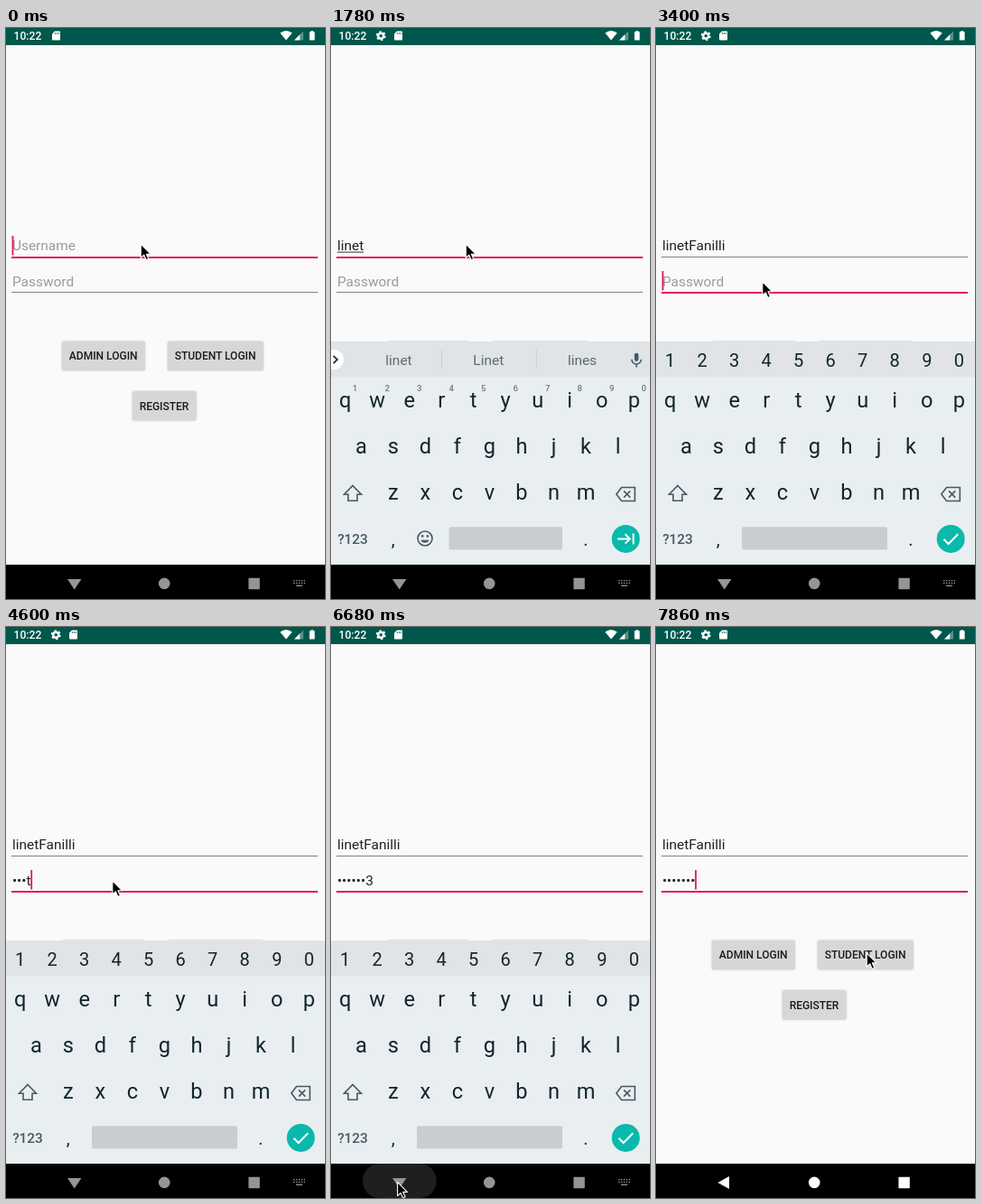
An HTML page for the animation above (8000 ms loop, 353 px wide and 632 px high).

```html
<!DOCTYPE html>
<html lang="en">
<head>
<meta charset="utf-8">
<title>Login screen</title>
<style>
  html, body { margin: 0; width: 100%; height: 100%; overflow: hidden; background: #fafafa; }
  svg { display: block; width: 100vw; height: 100vh; }
  text { font-family: Roboto, sans-serif; white-space: pre; }
  .mid { text-anchor: middle; }
  .field { font-size: 15.46px; fill: #212121; }
  .hint { fill: #9a9a9a; }
  .rule { fill: #808080; height: 1px; shape-rendering: crispEdges; }
  .rule.focus { fill: #e0165f; height: 2px; }
  .btn rect { fill: #d6d7d7; filter: drop-shadow(0 .8px .8px #0004); }
  .btn text { font-size: 12.03px; font-weight: 500; fill: #1c1c1c; text-anchor: middle; }
  .key { font-size: 23.6px; fill: #10262f; text-anchor: middle; }
  .digit { font-size: 20px; }
  .sup { font-size: 9.6px; font-weight: 500; fill: #6d7a80; text-anchor: middle; }
  .word { font-size: 15.46px; fill: #5c6a72; text-anchor: middle; }
  .line { fill: none; stroke: #455a64; stroke-width: 1.6; }
  .white { fill: none; stroke: #fff; stroke-width: 2; }
  .off { display: none; }
</style>
</head>
<body>
<svg viewBox="0 0 353 632" preserveAspectRatio="none">
  <rect width="353" height="632" fill="#fafafa"/>

  <g id="status">
    <rect width="353" height="19" fill="#00574b"/>
    <g fill="#fff">
      <text x="8.6" y="13.2" font-size="12.1" font-weight="500">10:22</text>
      <g id="gear" fill="none" stroke="#fff">
        <circle cx="55.2" cy="8.7" r="3" stroke-width="2.4"/>
        <circle cx="55.2" cy="8.7" r="4.6" stroke-width="1.7" stroke-dasharray="2.4 2.417"/>
      </g>
      <g id="card">
        <path d="M54 3.4h5.2q.8 0 .8.8v8.6q0 .8-.8.8h-7.4q-.8 0-.8-.8v-6.4z"/>
        <path d="M54.4 5v2M56.4 5v2M58.4 5v2" stroke="#00574b" stroke-width=".8"/>
      </g>
      <path d="M303.3 5.6Q310 .6 316.7 5.6L310 13.6z"/>
      <path d="M319 13.4L329 3.4V13.4z" opacity=".35"/>
      <path d="M319 13.4L325.2 7.2V13.4z"/>
      <path d="M337.3 3.2h2.8v1.1h1.5v9.3h-5.8v-9.3h1.5z"/>
    </g>
  </g>

  <text id="user" class="field" x="6.9" y="246.4"></text>
  <rect id="compose" x="6.9" y="247.6" height="1" fill="#333"/>
  <rect id="userLine" class="rule" x="6" y="253" width="339"/>
  <text id="pass" class="field" x="6.9" y="285.8"></text>
  <rect id="passLine" class="rule" x="6" y="292" width="339"/>
  <rect id="caret" width="1.8" height="21.5" fill="#e0165f"/>

  <g class="btn">
    <rect x="62" y="347" width="91.5" height="32" rx="1.5"/><text x="107.7" y="367.2">ADMIN LOGIN</text>
    <rect x="179" y="347" width="105.5" height="32" rx="1.5"/><text x="231.6" y="367.2">STUDENT LOGIN</text>
    <rect x="140" y="402.3" width="70.3" height="32" rx="1.5"/><text x="175" y="422.5">REGISTER</text>
  </g>

  <g id="board">
    <rect y="347" width="353" height="247" fill="#e9eef1"/>
    <rect y="347" width="353" height="39.3" fill="#e0e4e7"/>
    <g id="keys"></g>
    <path class="line" d="M24 506.5L33.5 516.3H29V523.3H19V516.3H14.5z"/>
    <path class="line" d="M321.5 508.5H336.3V523.5H321.5L315.8 516z"/>
    <path class="line" d="M324 512.4l7.2 7.2M331.2 512.4l-7.2 7.2"/>
    <text x="24" y="570.8" class="mid" font-size="15.4" font-weight="500" fill="#455a64">?123</text>
    <text x="68.7" y="573" class="key digit">,</text>
    <text x="282" y="573" class="key digit">.</text>
    <rect id="space" y="552.3" height="25.2" rx="2" fill="#c8cdd1"/>
    <circle cx="326.2" cy="565.4" r="15.5" fill="#09b9ab"/>

    <g id="textMode">
      <circle cx="3" cy="367" r="11" fill="#fff"/>
      <path d="M2.6 362.8L7 367l-4.4 4.2" fill="none" stroke="#263238" stroke-width="1.8"/>
      <rect x="335.7" y="359.7" width="4.6" height="9.2" rx="2.3" fill="#455a64"/>
      <path class="line" d="M332.8 366.8a5.2 5.2 0 0 0 10.4 0M338 372v3.4"/>
      <text id="tip" class="mid" x="174.3" y="372.7" font-size="14" fill="#12b5a6">Suggest contacts? Tap for info.</text>
      <g id="words">
        <text class="word" x="75" y="373"></text>
        <text class="word" x="174.3" y="373"></text>
        <text class="word" x="278" y="373"></text>
        <path d="M122.5 356.5v21M227.3 356.5v21" stroke="#c8cdd0"/>
      </g>
      <circle class="line" cx="104" cy="565" r="8"/>
      <path d="M99.4 566.8h9.2a4.8 4 0 0 1-9.2 0z" fill="#455a64"/>
      <circle cx="101.2" cy="562.4" r="1.3" fill="#455a64"/>
      <circle cx="106.8" cy="562.4" r="1.3" fill="#455a64"/>
      <path class="white" d="M317 565.4h13.5M325.6 560.2l5.2 5.2-5.2 5.2M334.6 559.4v12"/>
    </g>
    <g id="passMode">
      <path class="white" d="M318.4 565.8l5.2 5.2 10.6-10.8"/>
    </g>
  </g>

  <rect y="594" width="353" height="38" fill="#000"/>
  <rect id="ripple" y="594" height="38" rx="19" fill="#fff"/>
  <g id="nav">
    <g id="imeOpen">
      <path d="M68 610h15.4l-7.7 11.6z"/>
      <path d="M318 611.6h13M318 614.4h13" fill="none" stroke="#959595" stroke-width="1.3" stroke-dasharray="1.5 1.4"/>
      <path d="M321 616.6h7v1.3h-7z"/>
    </g>
    <path id="back" d="M81 608v14l-12.6-7z"/>
    <circle cx="175.2" cy="614.9" r="6.3"/>
    <rect x="268.4" y="608.8" width="12.4" height="12.4" rx=".6"/>
  </g>

  <path id="mouse" d="M0 0V15.2L3.5 12L6 17.6L8.6 16.4L6.1 11H10.8z"
    fill="#000" stroke="#fff" stroke-width="1.1" stroke-linejoin="round"/>
</svg>

<script>
const $ = id => document.getElementById(id);
const LOOP = 8000, BEAT = 148.2;   // the screen repaints once per beat
const NAME = 'linetFanilli', SECRET = 'test123', LEFT = 6.9;
const PATH = [[149.2, 239.2], [117.8, 280.8], [73.6, 614.4], [233.2, 360.8]];
const LEGS = [[19, 22], [40, 42], [46, 53]];   // beats of each mouse move

const clamp = (v, lo, hi) => Math.min(hi, Math.max(lo, v));
const ramp = (b, from, to) => clamp((b - from) / (to - from), 0, 1);
const ease = p => p * p * p * (10 - 15 * p + 6 * p * p);
const show = (el, on) => el.classList.toggle('off', !on);

// Keys pressed so far in a run of typing; power > 1 makes it speed up.
const burst = (b, start, rate, max, power = 1) =>
  b < start ? 0 : Math.min(max, Math.floor(1 + rate * (b - start) ** power));

const typed = b => burst(b, 3.7, 0.8, 5) + burst(b, 13, 0.32, 7, 2);
const secret = b => burst(b, 26, 0.62, 4) + burst(b, 35, 0.5, 3);

function set(el, attrs) {
  for (const k in attrs) el.setAttribute(k, attrs[k]);
}

function label(parent, x, y, cls, text) {
  const el = document.createElementNS('http://www.w3.org/2000/svg', 'text');
  set(el, { x, y, class: cls });
  el.textContent = text;
  parent.appendChild(el);
}

const colX = i => 15.6 + 35.52 * i;
['qwertyuiop', 'asdfghjkl', 'zxcvbnm'].forEach((row, r) =>
  [...row].forEach((c, i) => label($('keys'), colX(i + r * (r + 1) / 4), 419.8 + 51.3 * r, 'key', c)));
[...'1234567890'].forEach((c, i) => {
  label($('textMode'), colX(i) + 11, 402, 'sup', c);
  label($('passMode'), colX(i), 375, 'key digit', c);
});

function fill(el, value, hint) {
  el.textContent = value || hint;
  el.classList.toggle('hint', !value);
  return value ? el.getComputedTextLength() : 0;
}

function suggest(name) {
  const n = name.length;
  const list = n < 4 ? [] : n < 6 ? [name, 'L' + name.slice(1), 'lines'] : [name, name.toLowerCase()];
  show($('tip'), !list.length);
  show($('words'), list.length);
  document.querySelectorAll('.word').forEach((el, i) => { el.textContent = list[i] || ''; });
}

// The caret blinks from the latest edit on.
function caretOn(b) {
  const state = k => typed(k) + secret(k) + (k >= 23);
  let last = b;
  while (last > 0 && state(last - 1) === state(b)) last--;
  return (b - last) % 7 < 3;
}

function mouseAt(b) {
  return [0, 1].map(axis => LEGS.reduce(
    (v, [from, to], i) => v + (PATH[i + 1][axis] - PATH[i][axis]) * ease(ramp(b, from, to)), PATH[0][axis]));
}

function draw(b) {
  const n = secret(b), name = NAME.slice(0, typed(b));
  const masked = b >= 49 ? n : Math.max(0, n - 1);
  const onPass = b >= 22, passKeys = b >= 23, closed = b >= 47;

  const nameW = fill($('user'), name, 'Username');
  const passW = fill($('pass'), '•'.repeat(masked) + SECRET.slice(masked, n), 'Password');
  set($('compose'), { width: passKeys ? 0 : nameW });
  $('userLine').classList.toggle('focus', !onPass);
  $('passLine').classList.toggle('focus', onPass);
  set($('caret'), { x: LEFT - 0.3 + (onPass ? passW : nameW), y: onPass ? 269 : 230 });
  show($('caret'), caretOn(b));

  show($('gear'), b >= 3);
  set($('card'), { transform: `translate(${b >= 3 ? 19 : 0} 0)` });

  const hidden = 1 - ramp(b, 1, 3) + ramp(b, 45, 47);
  set($('board'), { transform: `translate(0 ${247 * hidden})` });
  show($('board'), hidden < 1);
  show($('textMode'), !passKeys);
  show($('passMode'), passKeys);
  set($('space'), passKeys ? { x: 95, width: 161 } : { x: 130.5, width: 125.5 });
  suggest(name);

  const r = 45 * ramp(b, 43, 45.2);
  set($('ripple'), { x: 75.8 - r, width: r * 2, opacity: 0.122 * (ramp(b, 43, 45) - ramp(b, 46, 48)) });
  set($('nav'), { fill: closed ? '#fff' : '#959595' });
  show($('imeOpen'), !closed);
  show($('back'), closed);

  set($('mouse'), { transform: `translate(${mouseAt(b).join(' ')})` });
}

const start = performance.now();
function frame() {
  const t = (performance.now() - start) % LOOP;
  draw(Math.floor(t / BEAT + 0.09));
  requestAnimationFrame(frame);
}
frame();
</script>
</body>
</html>
```
